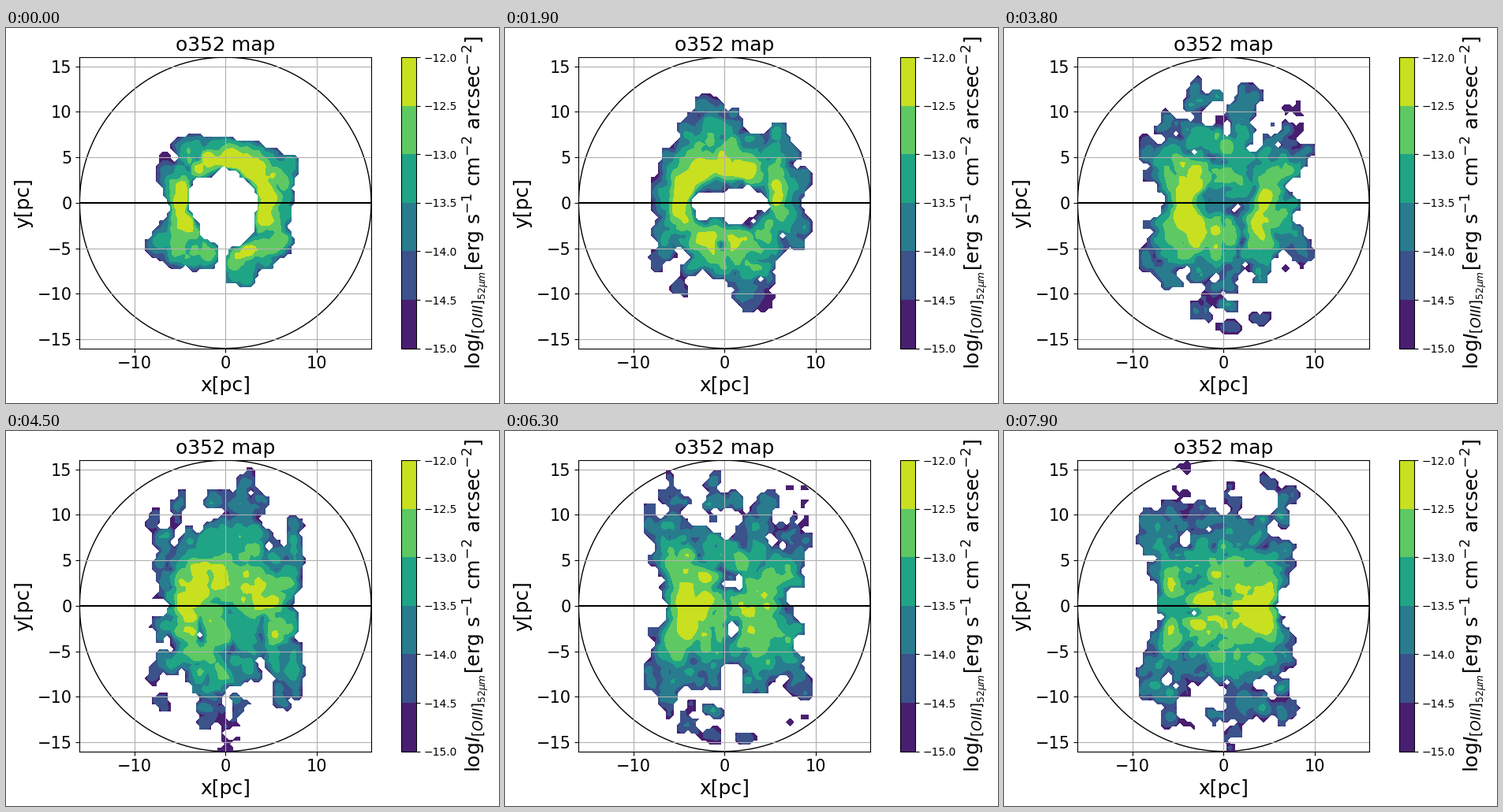
Animation of 625x476 px, one loop 8 s. Source, as a matplotlib script:

```python
import numpy as np
import matplotlib.pyplot as plt
from matplotlib.animation import FuncAnimation
from matplotlib.cm import ScalarMappable
from matplotlib.colors import BoundaryNorm, ListedColormap

W, H, DPI = 625, 476, 100
FRAMES, STEP_MS = 80, 100
SPIN, TILT = np.radians(15), np.radians(1)   # per frame
LEVELS = np.linspace(-15, -12, 7)
COLORS = plt.get_cmap("viridis")((np.arange(6) + 0.5) / 6)
GRID = np.linspace(-16, 16, 81)

# Face-on outline of the nebula, evenly spaced in azimuth
OUTER = [7.2, 7.3, 9.1, 7.8, 7.3, 7.4, 7.8, 8.0, 8.2, 9.0, 9.8, 7.0,
         5.5, 6.0, 9.8, 9.2, 8.8, 9.8, 8.4, 9.3, 8.4, 8.6, 8.6, 7.4]
INNER = [3.6, 3.8, 3.6, 4.1, 3.5, 4.0, 4.0, 3.8, 4.4, 5.2, 4.8, 3.8]
KNOTS = [(-4.5, -2.0, 2.8), (3.0, -5.0, 2.3), (1.0, 4.0, 1.9), (4.0, -1.5, 1.0)]
WINGS = [(212, 9.6, 9.5), (284, 9.2, 9.5), (33, 8.9, 10.5)]   # azimuth, radius, height


def ring(table, psi):
    az = np.arange(len(table)) * 360 / len(table)
    return np.interp(np.degrees(psi), az, table, period=360)


def limits(psi, z):
    hi = ring(OUTER, psi) - 0.3
    lo = ring(INNER, psi) + 0.4 + 0.17 * np.abs(z)
    return np.minimum(lo, hi - 0.6), hi


def make_cloud(parents=125, kids=6):
    """Clumps of a flared shell, mirrored in its equator: x, y, z, size, flux."""
    rng = np.random.default_rng(11)
    psi = rng.uniform(0, 2 * np.pi, parents)
    z = np.minimum(np.abs(rng.normal(0, 6.2, parents)), 14.6)
    lo, hi = limits(psi, z)
    flare = 0.15 + 0.85 * np.minimum(z / 6.5, 1)
    rad = lo + (hi - lo) * flare * rng.random(parents) ** 0.8
    bright = rng.normal(0, 0.38, parents)
    groups = [(rad * np.cos(psi), rad * np.sin(psi), z, bright)]

    s = np.linspace(0, 1, 6)
    for az, r_end, z_end in WINGS:
        az, rad = np.radians(az), 4.7 + (r_end - 4.7) * s
        groups.append((rad * np.cos(az), rad * np.sin(az),
                       1.5 + (z_end - 1.5) * s, 0.15 + 0 * s))
    groups += [(*np.reshape(k, (3, 1)), np.array([0.65])) for k in KNOTS]

    *pos, bright = np.repeat(np.hstack(groups), kids, axis=1)
    x, y, z = pos + rng.normal(0, 0.6, np.shape(pos))
    psi = np.arctan2(y, x)
    rad = np.clip(np.hypot(x, y), *limits(psi, z))
    x, y = rad * np.cos(psi), rad * np.sin(psi)
    size = rng.uniform(0.5, 0.9, x.size)
    log_flux = (-13.55 + bright + rng.normal(0, 0.15, x.size)
                - 0.05 * np.abs(z) - 0.12 * (rad - 4.5))

    # Narrow empty lane in the shell
    keep = ~((y < -3) & (np.abs(x + 0.4) < size))
    cloud = np.array([x, y, z, size, 10 ** log_flux])[:, keep]
    mirror = cloud * np.array([1, 1, -1, 1, 1])[:, None]
    return np.hstack([cloud, mirror])


CLOUD = make_cloud()


def project(n):
    x, y, z, size, flux = CLOUD
    phi, inc = n * SPIN, n * TILT
    u = x * np.cos(phi) + y * np.sin(phi)
    depth = y * np.cos(phi) - x * np.sin(phi)
    v = depth * np.cos(inc) + z * np.sin(inc)

    def kernel(c):
        return np.clip(1 - ((GRID[:, None] - c) / size) ** 2, 0, None)

    image = (kernel(v) * flux) @ kernel(u).T
    image = np.minimum(image, 10 ** -12.03)
    return np.ma.log10(np.ma.masked_less(image, 1.2e-15))


def pixel_axes(left, bottom, width, height):
    return fig.add_axes([left / W, bottom / H, width / W, height / H])


fig = plt.figure(figsize=(W / DPI, H / DPI), dpi=DPI, facecolor="white")
ax = pixel_axes(93.3, 69.38, 369.7, 369.5)
ax.set(xlim=(-16, 16), ylim=(-16, 16),
       xticks=[-10, 0, 10], yticks=range(-15, 16, 5))
ax.tick_params(labelsize=15)
ax.set_title("o352 map", fontsize=18)
ax.set_xlabel("x[pc]", fontsize=18)
ax.set_ylabel("y[pc]", fontsize=18)
ax.grid(True)
ax.axhline(0, color="black", lw=1.5)
ax.add_patch(plt.Circle((0, 0), 16, fill=False, ec="black", lw=1))

scale = ScalarMappable(BoundaryNorm(LEVELS, 6), ListedColormap(COLORS))
bar = fig.colorbar(scale, cax=pixel_axes(501.3, 69.38, 18.5, 369.5))
bar.minorticks_off()
bar.set_label(r"log$I_{[OIII]_{52\mu m}}$[erg s$^{-1}$ cm$^{-2}$ arcsec$^{-2}$]",
              fontsize=18)

shown = []


def update(n):
    while shown:
        shown.pop().remove()
    shown.append(ax.contourf(GRID, GRID, project(n), levels=LEVELS, colors=COLORS))
    return shown


anim = FuncAnimation(fig, update, frames=FRAMES, interval=STEP_MS,
                     repeat=True, repeat_delay=0, blit=False)
plt.show()
```
